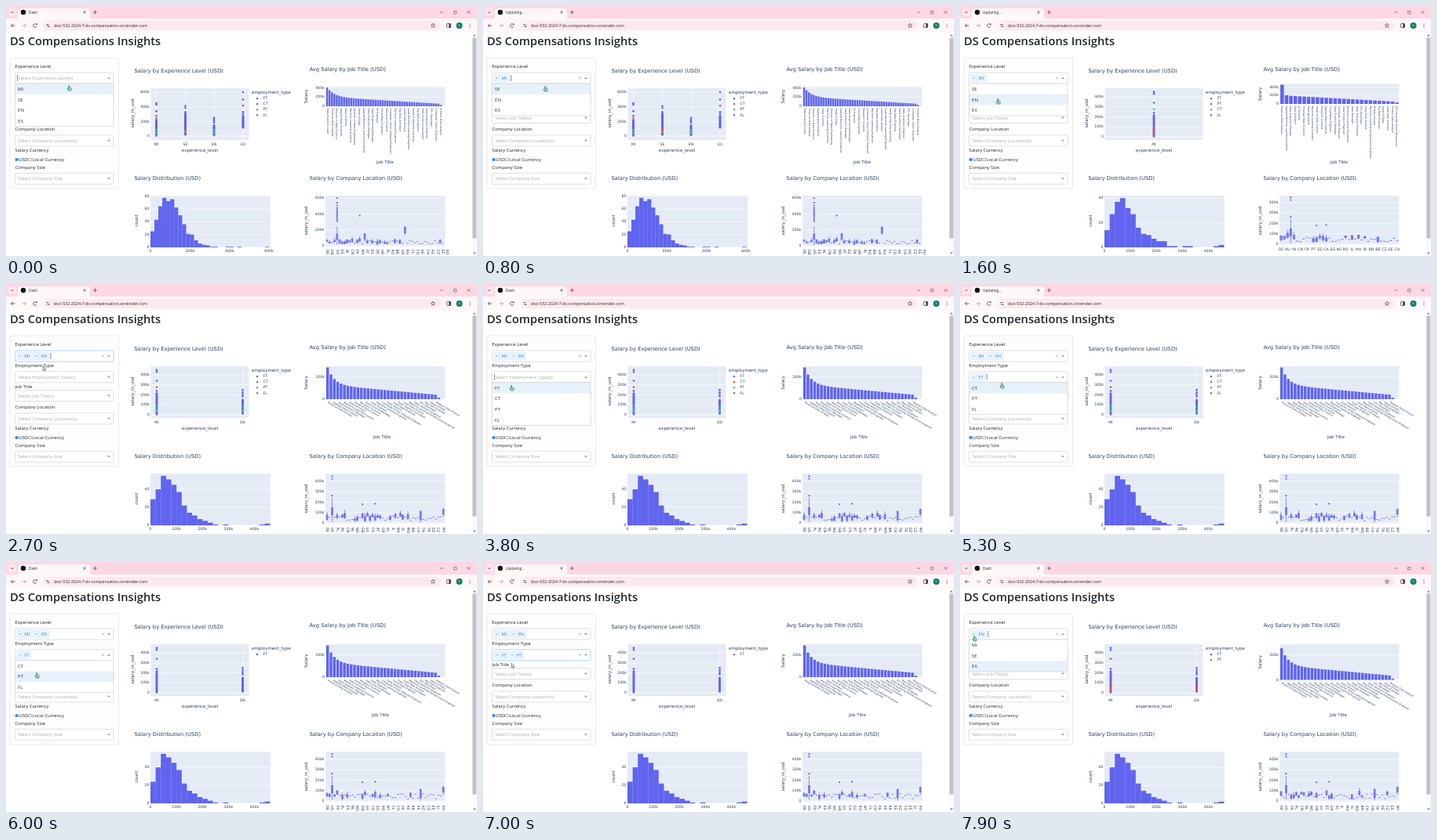
An HTML page with a canvas for the animation above (8 s loop, 600 by 319 pixels).

```html
<!DOCTYPE html>
<html lang="en">
<head>
<meta charset="utf-8">
<title>DS Compensations Insights</title>
<style>
html, body { margin: 0; width: 100%; height: 100%; overflow: hidden; background: #fff; }
canvas { display: block; width: 600px; height: 319px; }
</style>
</head>
<body>
<canvas id="stage"></canvas>
<script>
const LOOP = 8000;
const canvas = document.getElementById('stage');
const ctx = canvas.getContext('2d');
const dpr = window.devicePixelRatio || 1;
canvas.width = 600 * dpr;
canvas.height = 319 * dpr;

const UI = '"Open Sans", sans-serif';
const PLOT = '"DejaVu Sans", sans-serif';
const INK = '#2a3f5f', BLUE = '#6064ee', PANEL = '#e5ebf5', HOVER = '#e6f1fa';
const COLORS = [BLUE, '#e8503f', '#2ecb8f', '#8a66f4'];

// ---------- drawing helpers ----------
function rect(x, y, w, h, fill) {
  ctx.fillStyle = fill;
  ctx.fillRect(x, y, w, h);
}
function round(x, y, w, h, r, fill, stroke, lw = 0.6) {
  ctx.beginPath();
  ctx.roundRect(x, y, w, h, r);
  if (fill) { ctx.fillStyle = fill; ctx.fill(); }
  if (stroke) { ctx.strokeStyle = stroke; ctx.lineWidth = lw; ctx.stroke(); }
}
function dot(x, y, r, fill) {
  ctx.beginPath();
  ctx.arc(x, y, r, 0, 7);
  ctx.fillStyle = fill;
  ctx.fill();
}
function path(points, color, lw, fill) {
  ctx.beginPath();
  for (let i = 0; i < points.length; i += 2) ctx.lineTo(points[i], points[i + 1]);
  if (fill) { ctx.closePath(); ctx.fillStyle = fill; ctx.fill(); }
  if (color) { ctx.strokeStyle = color; ctx.lineWidth = lw; ctx.stroke(); }
}
function cross(x, y, r, color, lw = 0.7) {
  path([x - r, y - r, x + r, y + r], color, lw);
  path([x + r, y - r, x - r, y + r], color, lw);
}
function text(s, x, y, size, { color = INK, font = PLOT, align = 'left', rot = 0, weight = 400 } = {}) {
  ctx.save();
  ctx.translate(x, y);
  ctx.rotate(rot * Math.PI / 180);
  ctx.font = `${weight} ${size}px ${font}`;
  ctx.textAlign = align;
  ctx.textBaseline = 'middle';
  ctx.fillStyle = color;
  ctx.fillText(s, 0, 0);
  ctx.restore();
}
const ui = (s, x, y, color = '#212529', size = 5.9) => text(s, x, y + 0.6, size, { color, font: UI });
const tick = (s, x, y, align = 'center') => text(s, x, y, 4.7, { align });
const axis = (s, x, y, rot = 0) => text(s, x, y, 5.5, { align: 'center', rot });
const heading = (s, x, y) => text(s, x, y, 6.75);
const money = k => k ? k + 'k' : '0';

function seeded(seed) {
  return () => (seed = (seed * 16807) % 2147483647) / 2147483647;
}

// Panel with horizontal grid lines and left tick labels.
function panel(x, y, w, h, y0, k, step, max, label) {
  rect(x, y, w, h, PANEL);
  for (let v = 0; v <= max; v += step) {
    path([x, y0 - v * k, x + w, y0 - v * k], '#fff', v ? 0.5 : 0.9);
    tick(label(v), x - 1.5, y0 - v * k, 'right');
  }
}

// ---------- chart data, values in thousands ----------
const PEOPLE = {
  MI: { range: [5, 215], FT: [450, 430, 341, 240], CT: [277], PT: [85, 50, 30], FL: [20] },
  SE: { range: [20, 310], FT: [412, 385, 330], CT: [85, 110], PT: [60], FL: [45] },
  EN: { range: [12, 150], FT: [250, 225, 205, 185], CT: [], PT: [80, 50, 30], FL: [15] },
  EX: { range: [115, 280], FT: [600, 500, 330, 305], CT: [416], PT: [], FL: [] }
};

const JOBS_ALL = 'Data Analytics Lead|Financial Data Analyst|Director of Data Science|Applied Data Scientist|Data Scientist|Machine Learning Scientist|Director of Data Engineering|Head of Data|Applied Machine Learning Scientist|Data Analytics Manager|Data Engineering Manager|BI Engineer|Cloud Data Engineer|Research Scientist|Computer Vision Software Engineer|Machine Learning Engineer|Big Data Architect|Lead Data Analyst|Lead Machine Learning Engineer|Head of Machine Learning|Big Data Engineer|Data Science Consultant|Data Analytics Engineer|ETL Developer|Computer Vision Engineer|Product Data Analyst'.split('|');
const JOBS_MID = 'Financial Data Analyst|Applied Machine Learning Scientist|Data Analytics Manager|Data Architect|AI Scientist|Principal Data Scientist|Data Specialist|Machine Learning Scientist|Head of Data Science|Research Scientist|Applied Data Scientist|Cloud Data Engineer|Data Science Manager|Computer Vision Engineer|Data Science Engineer|Machine Learning Developer|Data Manager|Data Analytics Engineer|ETL Developer|Lead Data Analyst|Machine Learning Infrastructure Engineer|BI Data Analyst|Big Data Engineer|Head of Data|Lead Data Scientist|Product Data Analyst|3D Computer Vision Researcher'.split('|');
const JOBS_TWO = 'Financial Data Analyst|Applied Data Scientist|Data Analytics Manager|Machine Learning Scientist|Data Architect|Head of Data Science|Research Scientist|Data Science Manager|Data Engineer|Machine Learning Engineer|Computer Vision Software Engineer|Data Analyst|Cloud Data Engineer|Data Science Consultant|Lead Data Analyst|Machine Learning Infrastructure Engineer|Data Analytics Engineer|ETL Developer|Big Data Engineer|Head of Data|Product Data Analyst'.split('|');

const BINS_TWO = [29, 40, 55, 51, 45, 37, 22, 14, 11, 7, 5, 3, 1, 0, 1, 0, 0, 0, 0, 0, 0, 1, 2];
const BINS_FT = [24].concat(BINS_TWO.slice(1));

const two = (order, base, jobX, bins, places, seed) => ({
  cats: { MI: 192, EN: 301.5 }, order, y0: 167, k: 0.1275, step: 100, max: 400,
  job: { top: 105, base, k: (base - 119) / 200, max: 200, span: 146, n: 34, h: 18.5, drop: 13.5, peak: 22, fall: 2,
         names: JOBS_TWO, rot: 30, gap: 6.9, title: [jobX, 195.5] },
  hist: { k: 1.15, max: 40, px: 33.1, step: 100, end: 400, bins },
  box: { y0: 305, k: 0.133, step: 100, max: 400, n: 47, gap: 3.22, us: 2, out: [450, 425, 262], far: { 14: 180, 19: 185 },
         wide: { 37: [30, 110], 46: [85, 130] }, places, every: 2, rot: 90, seed }
});

const VIEWS = [
  {
    cats: { MI: 191.5, SE: 228.5, EN: 265, EX: 302 }, order: ['FT', 'CT', 'PT', 'FL'],
    y0: 166, k: 56 / 600, step: 200, max: 600,
    job: { top: 103, base: 128, k: 0.059, max: 400, span: 148, n: 48, h: 12, drop: 9, peak: 12, fall: 3,
           names: JOBS_ALL, rot: 90, gap: 5.75, title: [483, 199.5] },
    hist: { k: 0.82, max: 80, px: 25.2, step: 200, end: 600,
            bins: [25, 43, 64, 77, 72, 75, 62, 50, 36, 21, 20, 11, 6, 4, 3, 1, 1, 0, 0, 1, 1, 0, 1, 0, 0, 0, 0, 0, 0, 1] },
    box: { y0: 306, k: 0.1015, step: 200, max: 600, n: 47, gap: 3.2, us: 4,
           out: [600, 540, 505, 475, 450, 430, 410, 390, 370, 350, 330, 310], far: { 13: 380 }, wide: { 15: [80, 150], 31: [160, 235] },
           places: 'DE GB US ES IN CN FR MX AT ES DK HR PL RO BR UA RU CL CO AE CH AS CZ EE AU', every: 2, rot: 90, seed: 11 }
  },
  {
    cats: { MI: 247 }, order: ['FT', 'PT', 'CT', 'FL'], y0: 167, k: 0.1275, step: 100, max: 400,
    job: { top: 99.5, base: 125, k: 0.054, max: 400, span: 152, n: 27, h: 11, drop: 8.5, peak: 13.5, fall: 0.3,
           names: JOBS_MID, rot: 90, gap: 5.63, title: [483, 199.5] },
    hist: { k: 1.57, max: 40, px: 33.1, step: 100, end: 400,
            bins: [14, 27, 37, 40, 32, 27, 16, 11, 10, 7, 5, 5, 1, 1, 0, 1, 1, 0, 0, 0, 0, 1, 2] },
    box: { y0: 304, k: 0.133, step: 100, max: 400, n: 37, gap: 4.11, us: 3, out: [450, 425, 262], far: { 11: 180, 14: 185 }, wide: {},
           places: 'DE HU IN CN FR PT ES CA SG NG RO IL MX IR BR BE CZ EE CH', every: 2, rot: 0, seed: 23 }
  },
  two(['FT', 'CT', 'PT', 'FL'], 147, 479, BINS_TWO, 'DE US PL PK CN NL NG GB LU CA PT GR IQ IL MX IS MD BR CH TN TR DZ CZ MY', 37),
  two(['FT'], 147, 477, BINS_FT, 'DE US FR PL ES NL NG GB LU CA SG RO MT CL CO XE AE KR EE AZ CZ EE SI AU', 41),
  two(['FT', 'PT'], 150.5, 482, BINS_FT, 'DE US FR PL CN NL NO GB LU EC GR IQ IL MX IS MD BR CH VN TR AE CZ EE MY', 43)
];

// ---------- charts ----------
function drawScatter(v) {
  heading('Salary by Experience Level (USD)', 163.5, 83.2);
  panel(184.5, 105, 125, 66, v.y0, v.k, v.step, v.max, money);
  for (const x of Object.values(v.cats)) path([x, 105, x, 171], '#fff', 0.5);
  for (const [name, x] of Object.entries(v.cats)) {
    const p = PEOPLE[name];
    const [lo, hi] = p.range;
    const mark = (k, c) => dot(x, v.y0 - k * v.k, 1.3, c);
    for (let k = lo; k <= hi; k += 6) mark(k, BLUE);
    v.order.forEach((type, i) => p[type].forEach(k => mark(k, COLORS[i])));
    tick(name, x, 176.5);
  }
  axis('experience_level', 247, 185);
  axis('salary_in_usd', 162, 137, -90);
  text('employment_type', 313, 110.5, 5.5);
  v.order.forEach((type, i) => {
    dot(320, 118 + 7.1 * i, 1.25, COLORS[i]);
    text(type, 327.5, 118 + 7.1 * i, 4.7);
  });
}

function drawJobs(j) {
  heading('Avg Salary by Job Title (USD)', 386.5, 81);
  panel(407.5, j.top, 152, j.base - j.top, j.base, j.k, 200, j.max, money);
  const pitch = j.span / j.n;
  for (let i = 0; i < j.n; i++) {
    const h = i === j.n - 1 ? 1.8 : j.h - j.drop * i / j.n + j.peak * Math.exp(-i / j.fall);
    rect(407.5 + (i + 0.1) * pitch, j.base - h, pitch * 0.8, h, BLUE);
  }
  j.names.forEach((s, i) => text(s, 409.8 + i * j.gap, j.base + (j.rot === 90 ? 2.5 : 4), 3.25, { rot: j.rot }));
  axis('Job Title', ...j.title);
  axis('Salary', 383, (j.top + j.base) / 2, -90);
}

function drawHist(h) {
  heading('Salary Distribution (USD)', 163.5, 220);
  panel(184, 242, 153, 66, 308, h.k, 20, h.max, String);
  for (let k = 0; k <= h.end; k += h.step) tick(money(k), 184 + k * h.px / 100, 312.5);
  const w = h.px / 5;
  h.bins.forEach((n, i) => rect(184 + i * w, 308 - n * h.k, Math.min(w + 0.1, 153 - i * w), n * h.k, BLUE));
  axis('count', 167, 274, -90);
}

function drawBoxes(b) {
  heading('Salary by Company Location (USD)', 386.5, 220);
  panel(407, 242, 152.5, b.y0 + 1 - 242, b.y0, b.k, b.step, b.max, money);
  const rnd = seeded(b.seed * 7919);
  const Y = k => b.y0 - k * b.k;
  const w = b.gap * 0.6;
  for (let i = 0; i < b.n; i++) {
    const x = 409 + i * b.gap;
    let lo = 20 + rnd() * 50, hi = lo + 10 + rnd() * 32;
    let min = lo - rnd() * 18, max = hi + rnd() * 35;
    let full = rnd() < 0.75 - 0.7 * i / b.n;
    if (i === 0 || b.far[i]) full = true;
    if (b.far[i]) dot(x, Y(b.far[i]), 1.1, BLUE);
    if (b.wide[i]) {
      [lo, hi] = b.wide[i];
      min = lo - 25; max = hi + 12; full = true;
    }
    if (i === b.us) {
      lo = 80; hi = 148; min = 12; max = 240; full = true;
      b.out.forEach(k => dot(x, Y(k), 1.1, BLUE));
    }
    if (!full) {
      path([x - w / 2, Y(lo), x + w / 2, Y(lo)], BLUE, 0.9);
      continue;
    }
    path([x, Y(min), x, Y(max)], BLUE, 0.7);
    ctx.fillStyle = 'rgba(96,100,238,.6)';
    ctx.fillRect(x - w / 2, Y(hi), w, Y(lo) - Y(hi));
    ctx.strokeStyle = BLUE;
    ctx.lineWidth = 0.7;
    ctx.strokeRect(x - w / 2, Y(hi), w, Y(lo) - Y(hi));
  }
  b.places.split(' ').forEach((s, i) => {
    const x = 409 + i * b.gap * b.every;
    if (b.rot) text(s, x, 310.5, 4.7, { rot: 90 });
    else tick(s, x, 311);
  });
  axis('salary_in_usd', 383, 274, -90);
}

// ---------- browser window ----------
function drawWindow(title) {
  const line = '#4a3f44';
  rect(0, 0, 600, 17, '#fdd7e3');
  rect(0, 16, 600, 18, '#fff7f8');
  round(3, 3, 10, 10, 3, '#fbe6ec');
  path([6.3, 7.3, 8, 9, 9.7, 7.3], line, 0.8);
  round(15, 3, 92, 16, [4, 4, 0, 0], '#fff7f8');
  dot(22, 8, 3.2, '#111');
  ui(title, 29, 7.8, '#222', 4.7);
  cross(100, 8, 1.6, line);
  path([111, 8, 116, 8], line, 0.7);
  path([113.5, 5.5, 113.5, 10.5], line, 0.7);
  path([553, 8, 557, 8], line, 0.6);
  round(570.5, 6.5, 3.4, 3.4, 0.5, null, line);
  cross(589.5, 8, 1.8, line, 0.6);

  path([11.5, 25, 6.5, 25], line, 0.8);
  path([8.8, 22.7, 6.5, 25, 8.8, 27.3], line, 0.8);
  path([20.5, 25, 25.5, 25], '#a89da1', 0.8);
  path([23.2, 22.7, 25.5, 25, 23.2, 27.3], '#a89da1', 0.8);
  ctx.beginPath();
  ctx.arc(37, 25, 2.3, 0.5, 5.6);
  ctx.strokeStyle = line;
  ctx.lineWidth = 0.8;
  ctx.stroke();
  path([39.6, 22, 39.6, 24.2, 37.4, 24.2], null, 0, line);

  round(47.5, 19, 506, 12, 6, '#fbe9ee');
  dot(53.5, 25, 4.2, '#fff7f8');
  path([51.5, 23.8, 55.5, 23.8], line, 0.6);
  path([51.5, 26.3, 55.5, 26.3], line, 0.6);
  dot(52.4, 23.8, 0.8, line);
  dot(54.6, 26.3, 0.8, line);
  ui('dsci-532-2024-7-ds-compensation.onrender.com', 61, 24.8, '#2a2527', 5.25);
  const star = [];
  for (let i = 0; i <= 10; i++) {
    const a = i * Math.PI / 5 - Math.PI / 2, r = i % 2 ? 1.2 : 2.9;
    star.push(544 + r * Math.cos(a), 25 + r * Math.sin(a));
  }
  path(star, line, 0.6);
  round(561.5, 22.5, 5, 5, 0.8, null, line, 0.8);
  rect(564.2, 22.5, 2.3, 5, line);
  dot(577.5, 25, 4, '#12806a');
  text('S', 577.5, 25.2, 4.2, { color: '#fff', font: UI, align: 'center' });
  for (let i = -1; i < 2; i++) dot(591, 25 + i * 2, 0.6, line);

  rect(593.5, 34, 6.5, 285, '#fafafa');
  path([595, 38.5, 598.6, 38.5, 596.8, 36.2], null, 0, '#777');
  path([595, 314.5, 598.6, 314.5, 596.8, 316.8], null, 0, '#777');
  rect(594.3, 40.5, 5, 256, '#c1c1c1');
}

// ---------- sidebar ----------
const ROW = 13.65;
const FIELDS = [
  ['Experience Level', 'Select Experience Level(s)', 77, 92],
  ['Employment Type', 'Select Employment Type(s)', 104, 118.7],
  ['Job Title', 'Select Job Title(s)', 130.5, 142.5],
  ['Company Location', 'Select Company Location(s)', 157, 171.8],
  ['Company Size', 'Select Company Size', 206, 220.3]
];

function drawField([label, hint, ly, cy], tags, focused, open, caret) {
  ui(label, 11.5, ly);
  round(11.5, cy - 7, 125.5, 14, 1.6, '#fff', focused && !open ? '#7dbcff' : '#ccc');
  let x = 14;
  for (const tag of tags) {
    const w = tag === 'FT' || tag === 'PT' ? 17.8 : 19.5;
    round(x, cy - 4.8, w, 9.6, 0.8, '#ebf5ff', '#c2e0ff', 0.5);
    path([x + 7, cy - 4.8, x + 7, cy + 4.8], '#c2e0ff', 0.5);
    cross(x + 3.6, cy, 1.1, '#4a9ff0', 0.5);
    ui(tag, x + 9.5, cy, '#2a86e0', 5.7);
    x += w + 1.7;
  }
  if (!tags.length) ui(hint, 15.5, cy, '#aaa');
  else cross(123.8, cy, 1.4, '#999', 0.6);
  if (focused && caret) path([x + 0.6, cy - 4, x + 0.6, cy + 4], '#333', 0.6);
  const d = open ? -1 : 1;
  path([129, cy - d, 133, cy - d, 131, cy + d * 1.2], null, 0, '#999');
}

function drawMenu(top, options, active) {
  const h = options.length * ROW;
  rect(11.5, top, 125.5, h, '#fff');
  if (active < options.length) rect(11.5, top + active * ROW, 125.5, ROW, HOVER);
  ctx.strokeStyle = '#ccc';
  ctx.lineWidth = 0.6;
  ctx.strokeRect(11.5, top, 125.5, h);
  options.forEach((s, i) => ui(s, 15, top + ROW * (i + 0.5), '#333', 6.1));
}

// ---------- pointer ----------
const TRACK = [
  [0, 80, 104], [200, 79, 104], [800, 79, 105], [1100, 76, 107], [1400, 50, 119], [1600, 48, 121], [1900, 48, 120],
  [2300, 48, 107], [2800, 48, 107], [3100, 46, 112], [3400, 42, 120], [3800, 36, 132], [4300, 36, 132], [4900, 46, 130],
  [5300, 53, 129], [5800, 42, 140], [6000, 39, 144], [6500, 39, 144], [6800, 38, 136], [7300, 36, 125], [7700, 22, 100], [7900, 18, 97]
];
function pointerAt(t) {
  let i = TRACK.length - 1;
  while (TRACK[i][0] > t) i--;
  const a = TRACK[i], b = TRACK[i + 1] || a;
  const u = a === b ? 0 : (t - a[0]) / (b[0] - a[0]);
  return [a[1] + (b[1] - a[1]) * u, a[2] + (b[2] - a[2]) * u];
}
function drawPointer(x, y, hand) {
  ctx.save();
  ctx.translate(x + 0.6, y + 0.8);
  ctx.scale(0.88, 0.88);
  ctx.lineJoin = 'round';
  if (hand) path([-1, -3.6, 0.1, -3.6, 0.2, -1, 2.4, -0.4, 3, 0.4, 2.6, 3.6, -1.2, 3.6, -3, 0.8, -2.2, 0.2, -1, 1, -1, -3.6], '#2c7a50', 0.8, '#a5dcb8');
  else path([-1.5, -3.6, -1.5, 2.6, -0.2, 1.5, 0.8, 3.6, 1.7, 3.2, 0.8, 1.2, 2.6, 1, -1.5, -3.6], '#222', 0.6, '#fff');
  ctx.restore();
}

// ---------- timeline ----------
const pick = (t, ...steps) => steps.reduce((v, [at, next]) => t >= at ? next : v, steps[0][1]);

function draw(t) {
  ctx.setTransform(dpr, 0, 0, dpr, 0, 0);
  rect(0, 0, 600, 319, '#fff');

  const view = VIEWS[pick(t, [0, 0], [1600, 1], [2600, 2], [5500, 3], [7300, 4])];
  const busy = pick(t, [0, false], [500, true], [1700, false], [2000, true], [2700, false], [4500, true], [5600, false], [6500, true], [7400, false]);
  const levels = pick(t, [0, []], [400, ['MI']], [1900, ['MI', 'EN']], [7900, ['EN']]);
  const types = pick(t, [0, []], [4400, ['FT']], [6300, ['FT', 'PT']]);
  const open = pick(t, [0, 0], [2200, -1], [3300, 1], [6700, -1], [7900, 0]);
  const focus = pick(t, [0, 0], [3300, 1], [7900, 0]);
  const blink = pick(t, [0, 0], [600, 600], [2200, 2200], [3300, 3300], [5000, 5000], [7900, 7900]);
  const caret = (t - blink) % 1060 < 530;
  const [px, py] = pointerAt(t);

  text('DS Compensations Insights', 5, 46, 14.7, { color: '#212529', font: UI, weight: 600 });
  drawScatter(view);
  drawJobs(view.job);
  drawHist(view.hist);
  drawBoxes(view.box);

  round(5, 66, 138.5, 167, 2, '#fdfdfd', '#d8dadc');
  FIELDS.forEach((f, i) => drawField(f, i === 0 ? levels : i === 1 ? types : [], focus === i, open === i, caret));
  ui('Salary Currency', 11.5, 183.4);
  dot(13.7, 196, 2.3, '#0b6fe0');
  dot(13.7, 196, 1.75, '#fff');
  dot(13.7, 196, 1.3, '#0b6fe0');
  ui('USD', 16.5, 195.9);
  dot(30.7, 196, 2.3, '#777');
  dot(30.7, 196, 1.8, '#fff');
  ui('Local Currency', 33.5, 195.9);

  if (open >= 0) {
    const top = FIELDS[open][3] + 7;
    const all = open ? ['FT', 'CT', 'PT', 'FL'] : ['MI', 'SE', 'EN', 'EX'];
    const chosen = open ? types : levels;
    const over = t >= 7900 ? 2 : Math.max(0, Math.floor((py - top) / ROW));
    drawMenu(top, all.filter(s => !chosen.includes(s)), over);
  }
  drawWindow(busy ? 'Updating...' : 'Dash');
  drawPointer(px, py, open >= 0);
}

const start = performance.now();
function loop() {
  const t = (performance.now() - start) % LOOP;
  draw(Math.floor(t / 100) * 100);
  requestAnimationFrame(loop);
}
loop();
</script>
</body>
</html>
```
